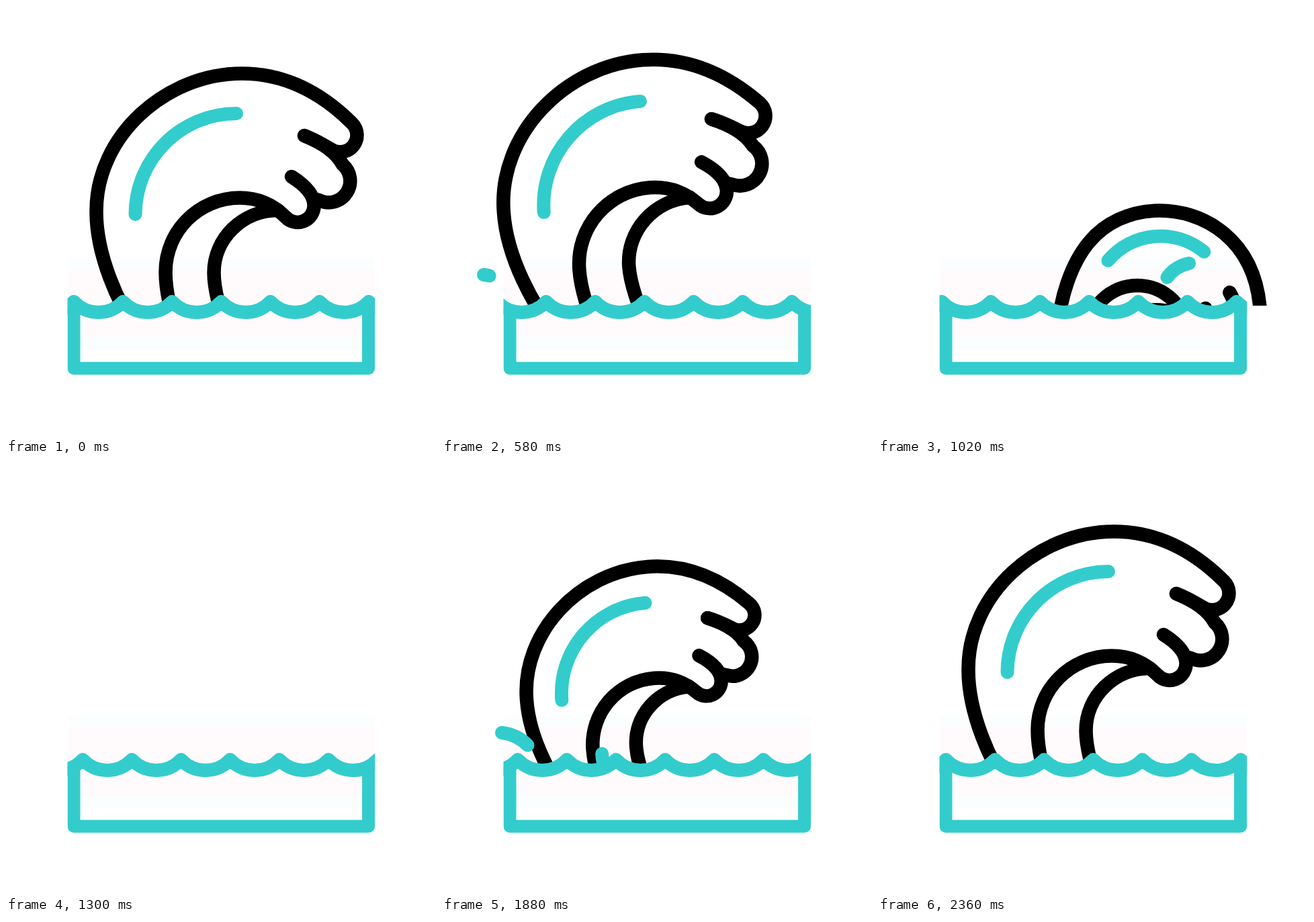
Animation of 640 by 640 pixels, one loop 2400 ms. Source, as an HTML page:

```html
<!DOCTYPE html>
<html lang="en">
<head>
<meta charset="utf-8">
<title>Wave</title>
<style>
  html, body { margin: 0; width: 100%; height: 100%; overflow: hidden; background: #fff; }
  svg { display: block; }
  path { fill: none; stroke: #000; stroke-width: 20.5; stroke-linecap: round; stroke-linejoin: round; }
  .teal { stroke: #33cccc; stroke-width: 20; }
  #wave path { vector-effect: non-scaling-stroke; }
</style>
</head>
<body>
<svg width="640" height="640">
  <clipPath id="air"><path d="M0 0H640V446H0Z"/></clipPath>
  <clipPath id="tank"><path d="M91.5 420H549.2V560H91.5Z"/></clipPath>
  <path d="M92 374H549V512H92Z" style="fill:#fafeff;stroke:none"/>
  <path d="M92 392H549V492H92Z" style="fill:#fffafc;stroke:none"/>
  <g clip-path="url(#air)">
    <g id="wave">
      <path d="M218 515C161 445 134 362 134.5 305C134.5 193 238 100.5 351 100.5C420 100.5 473 132.5 515 174.5A25 25 0 0 1 483.3 212.9C470 205 460 199 444 193"/>
      <path d="M444 193C471 204 491 217 501 236A32 32 0 0 1 467 289.5L458 287"/>
      <path d="M425 254C449 269 458.5 283 458.5 297A24.5 24.5 0 0 1 416 314C396 294 372 285.5 348 285.5C287 285.5 237.5 335 237.5 396C237.5 425 245 455 260 500"/>
      <path d="M405 304C352 304 309.5 346 309.5 397C309.5 420 318 455 332 490"/>
      <path class="teal" d="M343 160C260 160 192.5 228 192.5 310"/>
    </g>
    <g id="splashes"></g>
  </g>
  <g clip-path="url(#tank)">
    <path class="teal" style="stroke-width:19;stroke-linecap:butt" d="M101 450V539.3H539.5V450"/>
    <path class="teal" id="surface"/>
  </g>
</svg>
<script>
const LOOP = 2400, PERIOD = 73.15, SPLASH_TIME = 155;
const $ = id => document.getElementById(id);

const clamp = u => Math.min(Math.max(u, 0), 1);
const easeIn = p => u => u ** p;
const easeOut = p => u => 1 - (1 - u) ** p;
const easeInOut = u => u ** 2.1 / (u ** 2.1 + (1 - u) ** 2.1);

const rest = { x: 267.5, y: 235, scale: 1, angle: 0 };
const lean = { x: 224.5, y: 243, scale: .996, angle: -4 };
const swell = { x: 222.5, y: 224.5, scale: 1.03, angle: -4.3 };
const sunk = { x: 465, y: 541, scale: .58, angle: 51.5 };
const emerge = { x: 196, y: 573, scale: .7325, angle: -11.7 };

// Height has its own easing, so the wave can plunge and surge
const acts = [
  { end: 260, from: rest, to: lean, glide: easeInOut, lift: easeInOut },
  { end: 580, from: lean, to: swell, glide: easeInOut, lift: easeInOut },
  { end: 1290, from: swell, to: sunk, glide: easeOut(1.6), lift: easeIn(1.6) },
  { end: 1480, from: sunk, to: sunk, glide: easeInOut, lift: easeInOut },
  { end: 2200, from: emerge, to: rest, glide: easeInOut, lift: easeOut(2.5) },
  { end: LOOP, from: rest, to: rest, glide: easeInOut, lift: easeInOut }
];

function poseAt(t) {
  const i = acts.findIndex(act => t < act.end);
  const { end, from, to, glide, lift } = acts[i];
  const start = i ? acts[i - 1].end : 0;
  const u = (t - start) / (end - start);
  const mix = (key, ease) => from[key] + (to[key] - from[key]) * ease(u);
  return { x: mix("x", glide), y: mix("y", lift), scale: mix("scale", glide), angle: mix("angle", glide) };
}

const RIGHT = "M280 450C268 420 285 390 317 383", LEFT = "M146 450Q130 405 89 400";
const splashes = [
  [RIGHT, 105, 0], [LEFT, 288, -27], [RIGHT, 781, 146], [LEFT, 1655, 0], [RIGHT, 1847, -38]
].map(([d, start, dx]) => {
  const path = document.createElementNS("http://www.w3.org/2000/svg", "path");
  const attrs = { d, class: "teal", pathLength: 1, transform: `translate(${dx} 0)` };
  for (const name in attrs) path.setAttribute(name, attrs[name]);
  $("splashes").append(path);
  return { path, start };
});

$("surface").setAttribute("d", `M${101 - PERIOD} 440` + `a50 50 0 0 0 ${PERIOD} 0`.repeat(9));

function draw(now) {
  const t = now % LOOP;
  const { x, y, scale, angle } = poseAt(t);
  $("wave").setAttribute("transform",
    `translate(${x} ${y}) rotate(${angle}) scale(${scale}) translate(${-rest.x} ${-rest.y})`);

  // The surface drifts three scallops to the left per loop
  const drift = 3 * easeInOut(clamp(t / 2360)) % 1;
  $("surface").setAttribute("transform", `translate(${-drift * PERIOD} 0)`);

  // Each splash grows out of the water, then its tail catches up
  for (const { path, start } of splashes) {
    const p = (t - start) / SPLASH_TIME;
    const head = clamp(p), tail = clamp(p - 1);
    path.style.display = p > 0 && p < 2 ? "" : "none";
    path.style.strokeDasharray = `${head - tail} 2`;
    path.style.strokeDashoffset = -tail;
  }
}

function tick() {
  draw(performance.now());
  requestAnimationFrame(tick);
}
tick();
</script>
</body>
</html>
```
